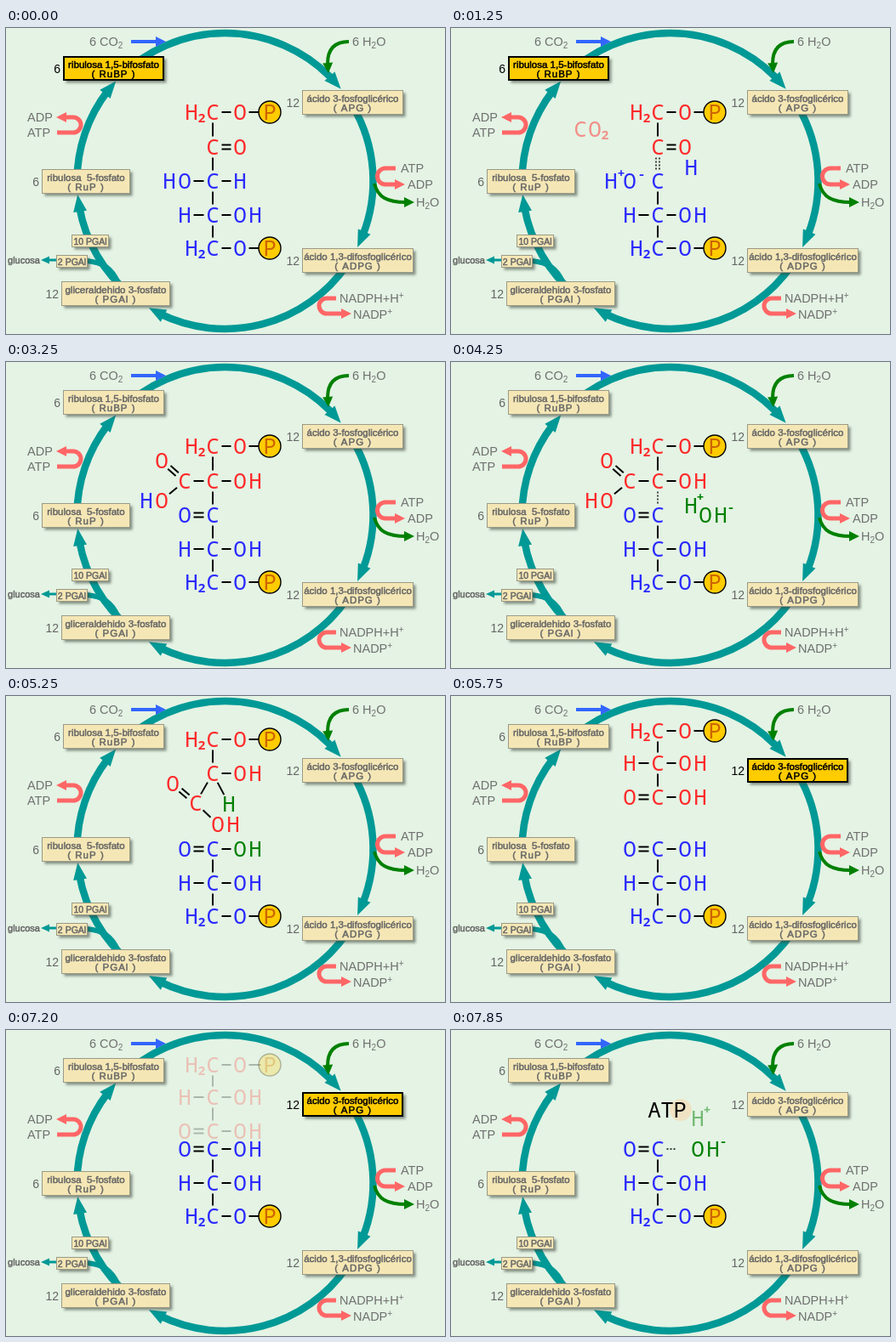
Write an HTML page with a canvas that moves like this. It is 516 by 360 pixels and loops after 8 s.

```html
<!DOCTYPE html>
<html lang="es">
<head>
<meta charset="utf-8">
<title>Ciclo de fijación del carbono</title>
<style>
html, body { margin: 0; width: 516px; height: 360px; overflow: hidden; }
canvas { display: block; }
</style>
</head>
<body>
<canvas width="516" height="360"></canvas>
<script>
const ctx = document.querySelector('canvas').getContext('2d');
const BACK = '#e4f3e4', TEAL = '#009996', RED = '#ff2a2a', BLUE = '#2a2aff', GREEN = '#008000';
const PINK = '#ff6666', GRAY = '#707070', GOLD = '#ffcc00';
const SANS = '"Liberation Sans", Arial, sans-serif', MONO = '"Noto Sans Mono", monospace';
const LOOP = 8000;
const clamp = (v, lo, hi) => Math.min(hi, Math.max(lo, v));

// The picture advances in hard steps: 20 of 250 ms, then a quicker run.
const lateSteps = [6750, 6900, 7050, 7200, 7350, 7600, 7850];
function stepAt(ms) {
  return clamp(Math.floor((ms - 750) / 250), 0, 20) + lateSteps.filter(s => ms >= s).length;
}

// Interpolates keys of the form [step, ...values].
function along(k, ...keys) {
  let i = keys.findIndex(key => key[0] >= k);
  if (i < 0) i = keys.length - 1;
  const b = keys[i], a = keys[Math.max(0, i - 1)];
  const f = a === b ? 1 : clamp((k - a[0]) / (b[0] - a[0]), 0, 1);
  return b.slice(1).map((v, n) => a[n + 1] + (v - a[n + 1]) * f);
}

function write(s, x, y, font, color, align = 'left') {
  ctx.font = font;
  ctx.fillStyle = color;
  ctx.textAlign = align;
  ctx.fillText(s, x, y);
}

function faded(alpha, draw) {
  ctx.globalAlpha = clamp(alpha, 0, 1);
  if (alpha > 0) draw();
  ctx.globalAlpha = 1;
}

// ---------- cycle diagram ----------
function triangle(x, y, angle, length, half, color) {
  ctx.save();
  ctx.translate(x, y);
  ctx.rotate(angle);
  ctx.fillStyle = color;
  ctx.fill(new Path2D(`M0 0L${-length} ${-half}V${half}Z`));
  ctx.restore();
}

function line(d, color, width) {
  ctx.strokeStyle = color;
  ctx.lineWidth = width;
  ctx.stroke(new Path2D(d));
}

function arrow(d, color, width, x, y, angle = 0, length = 12, half = 6) {
  line(d, color, width);
  triangle(x, y, angle, length, half, color);
}

function ringArrow(from, to) {
  const rad = Math.PI / 180, cx = 257.5, cy = 180, r = 174, tip = to * rad;
  ctx.strokeStyle = TEAL;
  ctx.lineWidth = 8.5;
  ctx.beginPath();
  ctx.arc(cx, cy, r, from * rad, (to - 5) * rad);
  ctx.stroke();
  triangle(cx + r * Math.cos(tip), cy + r * Math.sin(tip), tip + Math.PI / 2 - 0.05, 20, 8, TEAL);
}

// Text with "_" before a subscript and "^" before a superscript.
function formula(s, x, y) {
  for (const part of s.match(/[_^].|[^_^]+/g)) {
    const shift = { _: 3, '^': -5 }[part[0]];
    const str = shift ? part[1] : part;
    write(str, x, y + (shift || 0), `${shift ? 10 : 14.5}px ${SANS}`, GRAY);
    x += ctx.measureText(str).width;
  }
}

function plate(x, y, w, h, hot) {
  ctx.save();
  ctx.shadowColor = 'rgba(60, 70, 60, 0.6)';
  ctx.shadowOffsetX = ctx.shadowOffsetY = 2.5;
  ctx.shadowBlur = 3;
  ctx.fillStyle = hot ? GOLD : '#f5e7b5';
  ctx.fillRect(x, y, w, h);
  ctx.restore();
  ctx.strokeStyle = hot ? '#000' : '#9a9a86';
  ctx.lineWidth = hot ? 2 : 1;
  const inset = hot ? 1 : 0.5;
  ctx.strokeRect(x + inset, y + inset, w - 2 * inset, h - 2 * inset);
}

function heavy(s, x, y, color, size = 11.5) {
  write(s, x, y, `${size}px ${SANS}`, color, 'center');
  ctx.strokeStyle = color;
  ctx.lineWidth = 0.5;
  ctx.strokeText(s, x, y);
}

function compound(count, name, short, x, y, w, hot) {
  const color = hot ? '#000' : '#666';
  plate(x, y, w, 29, hot);
  heavy(name, x + w / 2, y + 13.5, color);
  ctx.letterSpacing = '1px';
  heavy(`( ${short} )`, x + w / 2, y + 25, color);
  ctx.letterSpacing = '0px';
  write(count, x - 3, y + 20, `14px ${SANS}`, color, 'right');
}

function cycle(k) {
  ringArrow(-135, -38.5);
  ringArrow(-30, 26.6);
  ringArrow(35, 121);
  ringArrow(130, 174.7);
  ringArrow(180, 222.5);
  line('M132 300C124 282 114 276 95 274', TEAL, 6);
  arrow('M60 273H49', TEAL, 3, 41, 273, Math.PI, 10, 4.5);

  arrow('M147 16H178', '#3366ff', 4, 188, 16);
  arrow('M403 16C386 16 378 25 378 42', GREEN, 4, 379, 53, 1.5);
  arrow('M433 183C437 199 448 205 470 205', GREEN, 4, 480, 205);
  arrow('M60 123H79A9 9 0 0 0 79 105H68', PINK, 5, 59, 105, Math.PI);
  arrow('M458 165H446A9.5 9.5 0 0 0 446 184H459', PINK, 5, 469, 184);
  arrow('M388 318H377A9 9 0 0 0 377 336H396', PINK, 5, 406, 336);

  formula('6 CO_2', 98, 21);
  formula('6 H_2O', 407, 21);
  formula('ADP', 25, 110);
  formula('ATP', 25, 128);
  formula('ATP', 464, 170);
  formula('ADP', 472, 189);
  formula('H_2O', 482, 210);
  formula('NADPH+H^+', 392, 323);
  formula('NADP^+', 408, 342);
  heavy('glucosa', 21, 277, '#666', 11);

  plate(77, 243, 44, 15);
  heavy('10 PGAl', 99, 254.5, '#666', 10.5);
  plate(59, 267, 37, 15);
  heavy('2 PGAl', 77.5, 278.5, '#666', 10.5);
  compound('6', 'ribulosa 1,5-bifosfato', 'RuBP', 67, 33, 119, k < 6);
  compound('12', 'ácido 3-fosfoglicérico', 'APG', 348, 73, 119, k >= 20 && k < 27);
  compound('6', 'ribulosa  5-fosfato', 'RuP', 42, 166, 104);
  compound('12', 'ácido 1,3-difosfoglicérico', 'ADPG', 348, 259, 131);
  compound('12', 'gliceraldehido 3-fosfato', 'PGAl', 65, 298, 128);
}

// ---------- molecules ----------
const atom = (s, [x, y], color) => write(s, x, y + 9.2, `500 26px ${MONO}`, color, 'center');
const mark = (s, x, y, color) => write(s, x, y + 5, `600 15px ${MONO}`, color, 'center');

function bond([x1, y1], [x2, y2], count = 1, dashed = false) {
  const length = Math.hypot(x2 - x1, y2 - y1);
  const ux = (x2 - x1) / length, uy = (y2 - y1) / length;
  const trim = 10.5 + 2 * Math.abs(uy);
  ctx.strokeStyle = '#000';
  ctx.lineWidth = dashed ? 1.4 : 2;
  ctx.setLineDash(dashed ? [2, 2] : []);
  for (let i = 0; i < count; i++) {
    const off = (i - (count - 1) / 2) * (dashed ? 4 : 5);
    ctx.beginPath();
    ctx.moveTo(x1 + ux * trim - uy * off, y1 + uy * trim + ux * off);
    ctx.lineTo(x2 - ux * trim - uy * off, y2 - uy * trim + ux * off);
    ctx.stroke();
  }
  ctx.setLineDash([]);
}

function disc(x, y, fill, outline) {
  ctx.beginPath();
  ctx.arc(x, y, 13, 0, 7);
  ctx.fillStyle = fill;
  ctx.fill();
  if (!outline) return;
  ctx.strokeStyle = '#000';
  ctx.lineWidth = 1.4;
  ctx.stroke();
}

function phosphateRow(y, color) {
  atom('H', [218, y], color);
  mark('2', 230, y + 7, color);
  atom('C', [243, y], color);
  bond([243, y], [275, y]);
  atom('O', [275, y], color);
  bond([275, y], [310, y]);
  disc(310, y, GOLD, true);
  atom('P', [310, y], '#cc6600');
}

function upperMolecule(k) {
  const [y1, y2] = along(k, [14, 99, 140], [18, 51, 91], [20, 41, 79]);
  const c2 = [243, y2], o2 = [275, y2];
  phosphateRow(y1, RED);
  bond([243, y1], c2);
  atom('C', c2, RED);
  bond(c2, o2, k < 3 ? 2 : 1);
  atom('O', o2, RED);
  const h = k < 6 ? along(k, [0, 275, 180], [5, 293, 140]) : [293, y2];
  atom('H', h, k < 5 ? BLUE : RED);

  // Carbon dioxide joins, turns into a carboxyl group and swings below.
  const c = along(k, [1, 150, 118], [6, 160, 124], [10, 210, 140], [14, 210, 140], [18, 223, 126], [20, 243, 119]);
  const oTop = along(k, [1, 167, 118], [6, 177, 124], [10, 183, 116], [14, 183, 116], [18, 196, 103], [20, 210, 119]);
  const oLow = along(k, [6, 177, 124], [10, 183, 163], [14, 183, 163], [15, 200, 163],
    [16, 216, 158], [18, 249, 151], [20, 275, 119]);
  const acidH = along(k, [0, 192, 180], [6, 180, 180], [10, 165, 163], [14, 165, 163], [15, 182, 162],
    [16, 234, 158], [18, 267, 151], [20, 293, 119]);
  faded(k / 4, () => {
    atom('C', c, RED);
    atom('O', oTop, RED);
    if (k < 8) mark('2', c[0] + 29, c[1] + 7, RED);
    else atom('O', oLow, RED);
  });
  atom('H', acidH, k < 11 ? BLUE : RED);
  if (k > 1 && k < 10) mark('+', acidH[0] + 12, acidH[1] - 9, BLUE);
  if (k > 8) {
    bond(c2, c);
    bond(c, oTop, 2);
    bond(c, oLow);
  }

  if (k > 10) faded((k - 9) / 4, () => {
    const color = k < 20 ? GREEN : RED;
    const water = along(k, [11, 291, 169], [14, 282, 169], [18, 262, 127]);
    const newH = k < 19 ? water : [210, y2];
    atom('H', newH, color);
    if (k < 17) mark('+', newH[0] + 11, newH[1] - 10, color);
    else bond(c2, newH);
  });

  const c3 = [243, 180];
  if (k < 2 || k > 8 && k < 13) bond(c2, c3);
  else if (k < 9) bond(c2, c3, 2, true);
  else if (k < 16) bond(c2, c3, 1, true);
}

function lowerMolecule(k) {
  const lift = 10 * clamp(k - 20, 0, 4);
  const y3 = 180 - lift, y4 = 220 - lift, y5 = 259 - lift;
  const c3 = [243, y3], c4 = [243, y4], o3 = [210, y3];
  atom('C', c3, BLUE);
  atom('O', o3, BLUE);
  if (k < 2) bond(o3, c3);
  else if (k < 9) mark('-', 224, y3 - 8, BLUE);
  else bond(o3, c3, 2);
  if (k < 1) bond(c3, [275, y3]);

  if (k > 10) faded((k - 9) / 4, () => {
    const leaving = k > 26;
    const x = leaving ? 290 : along(k, [11, 308], [14, 299], [18, 275])[0];
    const color = k < 20 || leaving ? GREEN : BLUE;
    atom('O', [x, y3], color);
    atom('H', [x + 18, y3], color);
    if (k < 17 || leaving) mark('-', x + 30, y3 - 9, color);
    if (k > 15) bond(c3, [leaving ? 276 : x, y3], 1, k < 17 || leaving);
  });

  bond(c3, c4);
  atom('H', [210, y4], BLUE);
  bond([210, y4], c4);
  atom('C', c4, BLUE);
  bond(c4, [275, y4]);
  atom('O', [275, y4], BLUE);
  atom('H', [293, y4], BLUE);
  bond(c4, [243, y5]);
  phosphateRow(y5, BLUE);
}

// The finished upper product, drawn at the current opacity.
function fadingMolecule() {
  phosphateRow(41, RED);
  bond([243, 41], [243, 79]);
  bond([243, 79], [243, 119]);
  [79, 119].forEach((y, i) => {
    atom(i ? 'O' : 'H', [210, y], RED);
    bond([210, y], [243, y], i + 1);
    atom('C', [243, y], RED);
    bond([243, y], [275, y]);
    atom('O', [275, y], RED);
    atom('H', [293, y], RED);
  });
}

function energyCarrier(k) {
  const [dx, dy] = along(k, [26, -5, -14], [27, 0, 0]);
  faded(k < 27 ? 0.4 : 1, () => {
    if (k > 26) disc(270, 94, '#f0e3c4');
    [...'ATP'].forEach((s, i) => atom(s, [239 + 15 * i + dx, 94 + dy], '#000'));
  });
  if (k > 26) faded(0.5, () => {
    atom('H', [290, 104], GREEN);
    mark('+', 301, 94, GREEN);
  });
}

function frame(now) {
  const k = stepAt(now % LOOP);
  ctx.fillStyle = BACK;
  ctx.fillRect(0, 0, 516, 360);
  cycle(k);
  if (k < 22) upperMolecule(k);
  else faded((25 - k) / 4, fadingMolecule);
  lowerMolecule(k);
  if (k > 25) energyCarrier(k);
  requestAnimationFrame(frame);
}

requestAnimationFrame(frame);
</script>
</body>
</html>
```
